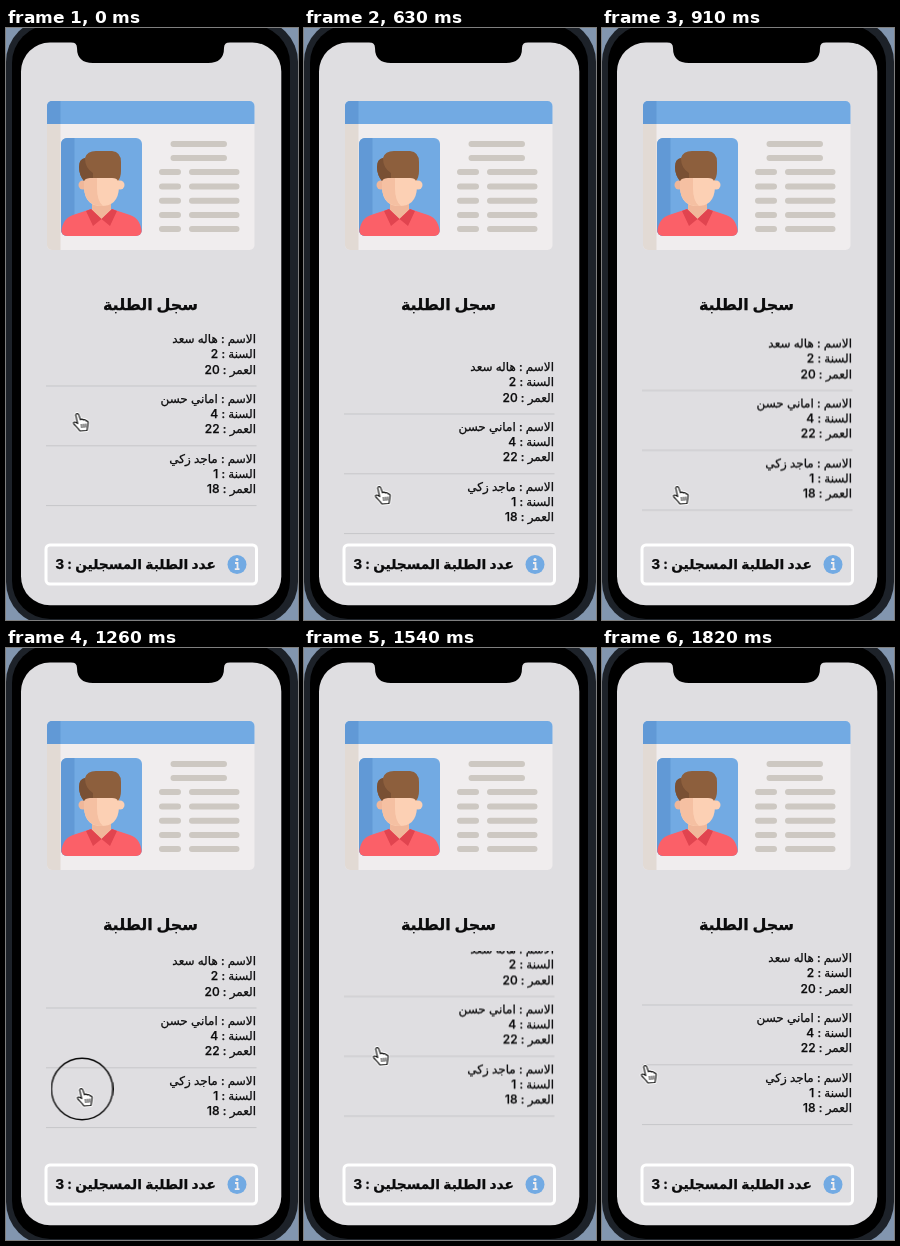
Recreate the animation shown at these times as an HTML page. Size 292 by 592 pixels, loop 1.89 s.

```html
<!DOCTYPE html>
<html lang="ar">
<head>
<meta charset="utf-8">
<title>سجل الطلبة</title>
<style>
  html, body { margin: 0; width: 100%; height: 100%; overflow: hidden; background: #8296af; }
  svg { display: block; width: 292px; height: 592px; }
  text { direction: rtl; font: 500 12px Inter, "DejaVu Sans", sans-serif; fill: #0b0b0c; stroke: #0b0b0c; stroke-width: .25; }
  .title { font-size: 16px; font-weight: 700; text-anchor: middle; }
  .total { font-size: 13.8px; font-weight: 700; }
  .rule { stroke: #c6c6c9; stroke-width: 1; }
  .list, .cursor, .ring { animation: 1890ms step-end infinite; }
  .list { animation-name: scroll; }
  .cursor { animation-name: point; }
  .ring { animation-name: press; fill: none; stroke: #0a0a0a; stroke-width: 1.4; }

  /* Rubber-band pull down, settle, pull up, settle */
  @keyframes scroll {
    0% { transform: translateY(0); }
    29.62% { transform: translateY(14px); }
    33.33% { transform: translateY(28px); }
    37.03% { transform: translateY(20px); }
    40.74% { transform: translateY(12.5px); }
    44.44% { transform: translateY(7.5px); }
    48.14% { transform: translateY(4.5px); }
    51.85% { transform: translateY(3px); }
    55.55% { transform: translateY(2px); }
    70.37% { transform: translateY(-8px); }
    74.07% { transform: translateY(-20px); }
    77.77% { transform: translateY(-15px); }
    81.48% { transform: translateY(-9.5px); }
    85.18% { transform: translateY(-5.6px); }
    88.88% { transform: translateY(-3.2px); }
    92.59% { transform: translateY(-1.8px); }
    96.29%, 100% { transform: translateY(-1px); }
  }
  @keyframes point {
    0% { transform: translate(74.5px, 394px); }
    25.92% { transform: translate(74.5px, 400px); }
    29.62% { transform: translate(76.5px, 434px); }
    33.33% { transform: translate(78.5px, 467px); }
    66.66% { transform: translate(78.5px, 449px); }
    70.37% { transform: translate(77.5px, 426px); }
    74.07% { transform: translate(76.5px, 408px); }
    85.18% { transform: translate(71.5px, 411px); }
    88.88% { transform: translate(61.5px, 417px); }
    92.59% { transform: translate(52.5px, 422px); }
    96.29%, 100% { transform: translate(46.5px, 426px); }
  }
  @keyframes press {
    0%, 33.33%, 74.07%, 100% { opacity: 0; }
    14.81%, 55.55% { opacity: 1; }
  }
</style>
</head>
<body>
<svg viewBox="0 0 292 592">
  <defs>
    <clipPath id="card"><rect x="41" y="73" width="207.5" height="149" rx="5"/></clipPath>
    <clipPath id="photo"><rect x="55" y="110" width="81" height="98" rx="6"/></clipPath>
    <clipPath id="viewport"><rect x="30" y="303" width="230" height="204"/></clipPath>
    <path id="hand" d="M-4.8-6.8Q-4.6-8.6-3-8.4Q-2-8.2-1.5-6.6L0-2.2C1-3.4 2.6-3 3-1.9C4-2.8 5.4-2.2 5.7-1C6.8-1.4 7.6-.6 7.6 .6C7.6 3 7.4 5 6.4 8.5L-.6 9C-2 6.5-4.5 4.5-6.7 2C-7.6 .6-6.3-.5-4.8 .3L-2.8 1.6Z"/>
  </defs>

  <!-- Phone -->
  <rect x="0" y="-9" width="292" height="606" rx="43" fill="#1d2229"/>
  <rect x="6" y="-3" width="278" height="594" rx="38"/>
  <rect x="15" y="14.5" width="260.3" height="562.8" rx="29" fill="#dfdee1"/>
  <path d="M65 14Q71 14.500 71 20Q71 35 87 35H202Q218 35 218 20Q218 14.500 224 14Z"/>

  <!-- Identity card -->
  <g clip-path="url(#card)">
    <rect x="41" y="73" width="208" height="150" fill="#f0edee"/>
    <rect x="41" y="96" width="13.5" height="127" fill="#e2dad4"/>
    <rect x="41" y="73" width="208" height="23" fill="#72aae3"/>
    <rect x="41" y="73" width="13.5" height="23" fill="#6199d6"/>
  </g>
  <path d="M167.5 116H218M167.5 130H218M156 144H172M186 144H230.5M156 158.500H172M186 158.500H230.500M156 172.700H172M186 172.700H230.500M156 187H172M186 187H230.500M156 201H172M186 201H230.500"
        stroke="#cdc8c2" stroke-width="6" stroke-linecap="round"/>
  <g clip-path="url(#photo)">
    <rect x="55" y="110" width="81" height="98" fill="#72aae3"/>
    <rect x="55" y="110" width="13.5" height="98" fill="#6199d6"/>
    <path d="M86 168H105V188L95.5 194L86 188Z" fill="#f0b79a"/>
    <path d="M55 208Q55 191 67 187L85 181L95.5 191L106 181L124 187Q136 191 136 208Z" fill="#fb6068"/>
    <path d="M85 181L95.5 191L87 198L80 183ZM106 181L95.5 191L104 198L111 183Z" fill="#e1444f"/>
    <circle cx="77" cy="157" r="4.5" fill="#f0b79a"/>
    <circle cx="114" cy="157" r="4.5" fill="#fcd0b4"/>
    <path d="M78 140H113V160Q112 178 95.5 178Q79 178 78 160Z" fill="#fcd0b4"/>
    <path d="M78 140H91V160Q91 173 97 178Q79 178 78 160Z" fill="#f5c0a2"/>
    <path d="M78 153Q73 147 73 139Q73 131 79 130Q81 123 90 123H106Q115 124 115 134V143Q115 149 112 153Q111 150 106 150H84Q79 150 78 153Z" fill="#8d5f3d"/>
    <path d="M78 153Q73 147 73 139Q73 131 79 130Q79 140 87 145V150H84Q79 150 78 153Z" fill="#795034"/>
  </g>

  <text class="title" x="144.5" y="282">سجل الطلبة</text>

  <g clip-path="url(#viewport)">
    <g class="list">
      <g transform="translate(250 315.3)">
        <text>الاسم : هاله سعد</text>
        <text y="15.2">السنة : 2</text>
        <text y="30.4">العمر : 20</text>
        <path class="rule" d="M-210 42.7H.5"/>
      </g>
      <g transform="translate(250 375.1)">
        <text>الاسم : اماني حسن</text>
        <text y="15.2">السنة : 4</text>
        <text y="30.4">العمر : 22</text>
        <path class="rule" d="M-210 42.7H.5"/>
      </g>
      <g transform="translate(250 434.9)">
        <text>الاسم : ماجد زكي</text>
        <text y="15.2">السنة : 1</text>
        <text y="30.4">العمر : 18</text>
        <path class="rule" d="M-210 42.7H.5"/>
      </g>
    </g>
  </g>

  <!-- Total -->
  <rect x="40" y="517" width="210.5" height="39" rx="4" fill="none" stroke="#fff" stroke-width="3"/>
  <circle cx="231" cy="536.5" r="9.5" fill="#72aae3"/>
  <circle cx="231" cy="531.5" r="1.5" fill="#f0edee"/>
  <path d="M229 535H231.5V541M228.8 541.2H233.5" fill="none" stroke="#f0edee" stroke-width="1.8"/>
  <text class="total" x="210" y="541">عدد الطلبة المسجلين : 3</text>

  <g class="cursor">
    <circle class="ring" cx="-2.4" cy="-8" r="30.7"/>
    <use href="#hand" fill="#fff" stroke="#fff" stroke-width="3" stroke-linejoin="round"/>
    <use href="#hand" fill="#fff" stroke="#111" stroke-width="1.2" stroke-linejoin="round"/>
    <path d="M.8 2L1.3 6M3 1.8L3.3 5.8M5.2 1.6V5.5" stroke="#111" stroke-width=".9"/>
  </g>
</svg>
</body>
</html>
```
